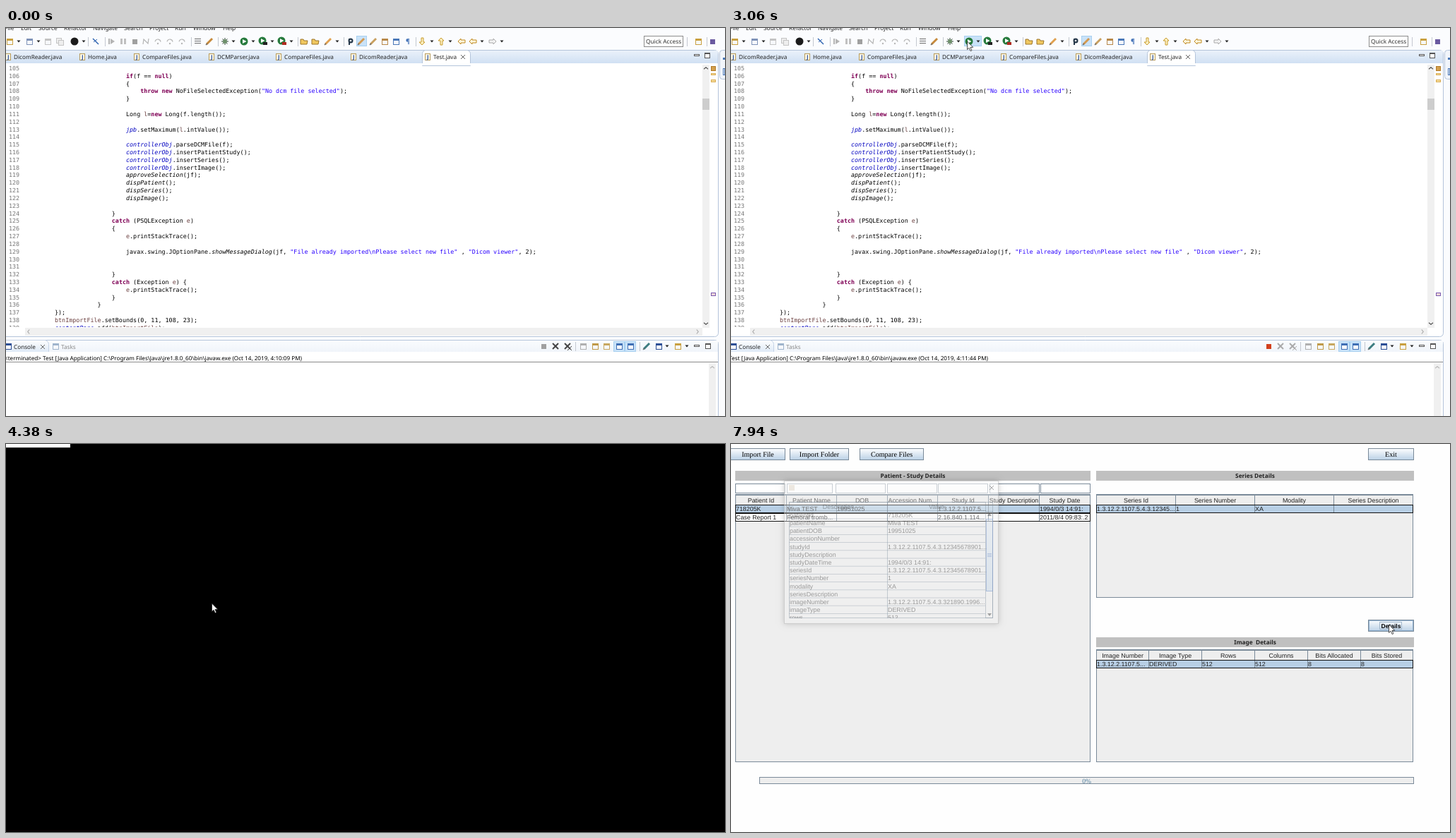
An HTML page with a canvas that plays this animation: 1018x550 px, repeating every 8000 ms.

```html
<!DOCTYPE html>
<html lang="en">
<head>
<meta charset="utf-8">
<title>Dicom viewer</title>
<style>
html, body { margin: 0; width: 100%; height: 100%; overflow: hidden; background: #fff; }
canvas { display: block; width: 1018px; height: 550px; }
</style>
</head>
<body>
<canvas id="stage" width="1018" height="550"></canvas>
<script>
const W = 1018, H = 550, LOOP = 8000;
const ctx = document.getElementById('stage').getContext('2d');
const MONO = '"DejaVu Sans Mono", monospace';
const UI = '"Noto Sans", sans-serif';
const ARIAL = '"Liberation Sans", sans-serif';
const SERIF = '"Liberation Serif", serif';
const CELL = '8.9px ' + ARIAL;
const STEEL = '#7a8a99', PICK = '#b8cfe5', GRAY = '#eeeeee';

function box(x, y, w, h, fill, line) {
  if (fill) { ctx.fillStyle = fill; ctx.fillRect(x, y, w, h); }
  if (line) { ctx.strokeStyle = line; ctx.lineWidth = 1; ctx.strokeRect(x + .5, y + .5, w - 1, h - 1); }
}
function text(s, x, y, font, color = '#000', align = 'left') {
  ctx.font = font; ctx.fillStyle = color; ctx.textAlign = align;
  ctx.fillText(s, x, y);
}
function path(points, line, width = 1, fill) {
  ctx.beginPath();
  points.forEach(([x, y]) => ctx.lineTo(x, y));
  if (fill) { ctx.closePath(); ctx.fillStyle = fill; ctx.fill(); }
  if (line) { ctx.strokeStyle = line; ctx.lineWidth = width; ctx.stroke(); }
}
function disc(x, y, r, fill) {
  ctx.beginPath(); ctx.arc(x, y, r, 0, 7); ctx.fillStyle = fill; ctx.fill();
}
function fade(y0, y1, a, b) {
  const g = ctx.createLinearGradient(0, y0, 0, y1);
  g.addColorStop(0, a); g.addColorStop(1, b);
  return g;
}
function panel(x, y, w, h, r, fill, line) {
  ctx.beginPath(); ctx.roundRect(x + .5, y + .5, w, h, r);
  ctx.fillStyle = fill; ctx.fill();
  ctx.strokeStyle = line; ctx.lineWidth = 1; ctx.stroke();
}

// Small toolbar glyphs, centred on x, y
const glyph = {
  drop(x, y) { path([[x - 2.5, y - 1.5], [x + 2.5, y - 1.5], [x, y + 1.5]], null, 1, '#222'); },
  sep(x, y) { box(x, y - 6, 1, 13, '#c4c8d0'); },
  page(x, y, c) { box(x - 4, y - 4, 9, 9, '#f6f8fc', c); box(x - 4, y - 4, 9, 3, c); },
  multi(x, y, c) { box(x - 5, y - 5, 8, 8, '#eee', c); box(x - 2, y - 2, 8, 8, '#eee', c); },
  square(x, y, c) { box(x - 4, y - 3, 7, 7, c); },
  disc(x, y, c) { disc(x, y, 5.5, c); },
  slash(x, y, c) { path([[x - 4, y - 4], [x + 4, y + 4]], c, 1.5); path([[x - 3, y + 1], [x + 2, y - 3]], c, 1); },
  step(x, y, c) { box(x - 4, y - 4, 2, 8, c); path([[x - 1, y - 4], [x + 5, y], [x - 1, y + 4]], null, 1, c); },
  pause(x, y, c) { box(x - 4, y - 4, 3, 8, c); box(x + 1, y - 4, 3, 8, c); },
  zig(x, y, c) { path([[x - 4, y + 4], [x - 3, y - 3], [x + 3, y + 3], [x + 4, y - 4]], c, 1.2); },
  arc(x, y, c) { ctx.beginPath(); ctx.arc(x, y + 1, 4, 3.3, 6.2); ctx.strokeStyle = c; ctx.lineWidth = 1.2; ctx.stroke(); disc(x, y + 3, 1.2, c); },
  lines(x, y, c) { for (let i = -4; i < 5; i += 3) box(x - 4, y + i, 9, 1, c); },
  bug(x, y, c) { for (let a = 0; a < 3.1; a += .785) path([[x - 5 * Math.cos(a), y - 5 * Math.sin(a)], [x + 5 * Math.cos(a), y + 5 * Math.sin(a)]], c, 1); disc(x, y, 3, '#6d8f6a'); },
  run(x, y, c) { disc(x, y, 5.5, c); path([[x - 2, y - 3], [x + 3.5, y], [x - 2, y + 3]], null, 1, '#fff'); },
  tool(x, y, c) { glyph.run(x - 1, y - 1, '#267a3c'); box(x, y + 1, 6, 4, c); },
  folder(x, y, c) { path([[x - 5, y + 4], [x - 5, y - 3], [x - 1, y - 3], [x, y - 1], [x + 5, y - 1], [x + 4, y + 4]], '#9c7428', 1, c); },
  pen(x, y, c) { path([[x - 4, y + 4], [x + 4, y - 4]], c, 3); path([[x - 5, y + 5], [x - 3, y + 3]], '#666', 1.5); },
  flag(x, y, c) { box(x - 2, y - 4, 2, 9, c); disc(x + 1, y - 1, 3.5, c); disc(x + 1, y - 1, 1.3, '#fff'); },
  left(x, y, c) { path([[x - 5, y], [x - 1, y - 4], [x - 1, y - 2], [x + 5, y - 2], [x + 5, y + 2], [x - 1, y + 2], [x - 1, y + 4], [x - 5, y]], c, 1, '#fdf6dc'); },
  right(x, y, c) { path([[x + 5, y], [x + 1, y - 4], [x + 1, y - 2], [x - 5, y - 2], [x - 5, y + 2], [x + 1, y + 2], [x + 1, y + 4], [x + 5, y]], c, 1, '#f2f2f2'); },
  down(x, y, c) { path([[x, y + 5], [x - 4, y + 1], [x - 1, y + 1], [x - 1, y - 5], [x + 2, y - 5], [x + 2, y + 1], [x + 4, y + 1], [x, y + 5]], c, 1, '#fdf0c0'); },
  up(x, y, c) { path([[x, y - 5], [x - 4, y - 1], [x - 1, y - 1], [x - 1, y + 5], [x + 2, y + 5], [x + 2, y - 1], [x + 4, y - 1], [x, y - 5]], c, 1, '#fdf0c0'); },
  cross(x, y, c) { path([[x - 4, y - 4], [x + 4, y + 4]], c, 2); path([[x + 4, y - 4], [x - 4, y + 4]], c, 2); },
  close(x, y, c) { path([[x - 3, y - 3], [x + 3, y + 3]], c, 1); path([[x + 3, y - 3], [x - 3, y + 3]], c, 1); },
  min(x, y) { box(x - 4, y - 2, 8, 3, '#fff', '#555'); },
  max(x, y) { box(x - 4, y - 4, 8, 8, '#fff', '#555'); box(x - 4, y - 4, 8, 2, '#555'); }
};
function icons(list, y) {
  list.split(',').forEach(item => {
    const [x, kind, color] = item.trim().split(' ');
    glyph[kind](+x, y, color);
  });
}
const TOOLBAR = `5 page #c9a040,18 drop,33 page #7f93b8,46 drop,59 page #c4c4c4,76 multi #c4c4c4,97 disc #1b1b1b,110 drop,
116 sep,127 slash #2d62b0,140 sep,149 step #b4b4b4,166 pause #c0c0c0,183 square #a0a0a0,198 zig #b4b4b4,215 arc #b8b8b8,
232 arc #b8b8b8,249 arc #b8b8b8,262 sep,271 lines #666,288 pen #c78a3c,300 sep,310 bug #33453c,322 drop,
350 drop,364 tool #222,377 drop,391 tool #b02a20,404 drop,413 sep,422 folder #f0c860,438 folder #f0c860,456 pen #e0a050,469 drop,
478 sep,487 flag #26384a,520 pen #c9a060,536 page #b8894a,552 page #4a78b8,580 sep,589 down #c79a2c,603 drop,616 up #c79a2c,
629 drop,645 left #c08a20,661 left #c08a20,674 drop,689 right #aaa,702 drop,964 sep,980 page #c9a040,992 sep,1001 square #6a5aa0`;
const CONSOLE = `806 sep,817 page #b0b0b0,834 page #c09a48,850 page #c8a860,868 page #3f6fb5,884 page #3f6fb5,897 sep,
907 pen #3c7d80,924 page #2c4f96,936 drop,951 page #c9a040,964 drop,978 min,994 max`;

const CODE = [[], [5, 'if(f == null)'], [5, '{'], [6, 'throw new NoFileSelectedException("No dcm file selected");'],
  [5, '}'], [], [5, 'Long l=new Long(f.length());'], [], [5, 'jpb.setMaximum(l.intValue());'], [],
  [5, 'controllerObj.parseDCMFile(f);'], [5, 'controllerObj.insertPatientStudy();'],
  [5, 'controllerObj.insertSeries();'], [5, 'controllerObj.insertImage();'], [5, 'approveSelection(jf);'],
  [5, 'dispPatient();'], [5, 'dispSeries();'], [5, 'dispImage();'], [], [4, '}'],
  [4, 'catch (PSQLException e)'], [4, '{'], [5, 'e.printStackTrace();'], [],
  [5, 'javax.swing.JOptionPane.showMessageDialog(jf, "File already imported\\nPlease select new file" , "Dicom viewer", 2);'],
  [], [], [4, '}'], [4, 'catch (Exception e) {'], [5, 'e.printStackTrace();'], [4, '}'], [3, '}'], [0, '});'],
  [0, 'btnImportFile.setBounds(0, 11, 108, 23);'], [0, 'contentPane.add(btnImportFile);']];
const CHAR = 5.05, LINE = 10.82;

function style(t) {
  if (t[0] === '"') return ['', '#2a00ff'];
  if (/^(if|null|throw|new|catch)$/.test(t)) return ['bold ', '#7f0055'];
  if (/^(jpb|controllerObj|contentPane)$/.test(t)) return ['italic ', '#0000c0'];
  if (/^(approveSelection|disp\w+|showMessageDialog)$/.test(t)) return ['italic ', '#000'];
  if (/^(l|e|btnImportFile)$/.test(t)) return ['', '#6a3e3e'];
  return ['', '#000'];
}
function code() {
  ctx.save();
  ctx.beginPath(); ctx.rect(0, 50, 986, 374); ctx.clip();
  CODE.forEach(([indent, src], i) => {
    const y = 60 + i * LINE;
    text(105 + i, 4, y, '8.39px ' + MONO, '#787878');
    if (!src) return;
    for (const m of src.matchAll(/"[^"]*"|\w+|[^\w"\s]+/g)) {
      const [face, color] = style(m[0]);
      text(m[0], 69 + indent * 4 * CHAR + m.index * CHAR, y, face + '8.39px ' + MONO, color);
    }
  });
  ctx.restore();
}
function chevron(x, y, dx, dy, c = '#555') {
  path([[x - dx - dy * 2.5, y - dy - dx * 2.5], [x + dx, y + dy], [x - dx + dy * 2.5, y - dy + dx * 2.5]], c, 1.2);
}
function javaFile(x) {
  box(x - 4, 36, 8, 10, '#fffbe8', '#b89a58');
  text('J', x - 1, 44, 'bold 8px ' + UI, '#2b4f9e');
}

function ide(t) {
  box(0, 0, W, H, '#fbfcfe');
  'File Edit Source Refactor Navigate Search Project Run Window Help'.split(' ').forEach((s, i) =>
    text(s, [-2, 21, 46, 82, 123, 167, 203, 239, 265, 307][i], 3, '8.36px ' + UI, '#222'));
  if (t >= 1820) box(330, 11, 25, 15, '#c9e2f8', '#a8d0f0');
  box(496, 11, 15, 15, '#c9e2f8', '#a8d0f0');
  icons(TOOLBAR, 19);
  glyph.run(337, 19, '#267a3c');
  glyph.pen(503, 19, '#d49a50');
  text('¶', 569, 22, 'bold 9px ' + UI, '#3f6fb5', 'center');
  box(903, 11, 56, 16, '#fff', '#8c8c8c');
  text('Quick Access', 906, 22, '8.3px ' + UI, '#333');

  // Editor
  panel(-8, 31, 1016, 406, 5, '#fff', '#b4c4da');
  box(0, 32, 1008, 18, fade(32, 50, '#eaf1fa', '#d0e0f3'));
  panel(589, 31, 68, 22, [5, 5, 0, 0], '#fff', '#b4c4da');
  box(0, 50, 1008, 3, '#fff');
  'DicomReader Home CompareFiles DCMParser CompareFiles DicomReader Test'.split(' ').forEach((s, i) => {
    const x = [11, 116, 193, 299, 394, 500, 605][i];
    javaFile(x - 8);
    text(s + '.java', x, 43.5, '8.2px ' + UI, '#222');
  });
  glyph.close(647, 41, '#666');
  glyph.min(978, 39); glyph.max(993, 39);
  code();
  box(986, 52, 10, 373, '#f0f0f0');
  box(986, 100, 10, 16, '#cdcdcd');
  chevron(991, 57, 0, -1.2); chevron(991, 419, 0, 1.2);
  box(27, 425, 959, 11, '#f0f0f0');
  chevron(32, 430.5, -1.2, 0, '#aaa'); chevron(979, 430.5, 1.2, 0, '#aaa');
  box(998, 54, 7, 7, '#d3a04f', '#b07a28');
  box(998, 64, 7, 3, '#f6dc9a', '#d8ab52');
  box(998, 73, 7, 4, '#f6dc9a', '#d8ab52');
  box(998, 375, 7, 5, '#f2d8d8', '#7a5ab0');
  panel(1010, 31, 20, 41, 4, '#f1f5fb', '#b4c4da');
  box(1015, 42, 3, 3, '#4a78b8'); box(1015, 57, 3, 10, '#fff', '#4a78b8');

  // Console
  const live = t >= 2360;
  panel(-8, 442, 1016, 130, 5, '#fff', '#b4c4da');
  box(0, 443, 1008, 16, fade(443, 459, '#fafcfe', '#f0f4fa'));
  panel(-8, 442, 68, 20, [0, 6, 0, 0], fade(442, 460, '#fff', '#dce8f6'), '#c4d2e6');
  box(0, 459, 1008, 15, '#fff');
  glyph.page(3, 451, '#2c4f96');
  text('Console', 11, 454.5, '8.2px ' + UI, '#222');
  glyph.close(52, 452, '#666');
  glyph.page(70, 451, '#9fb4cc');
  text('Tasks', 78, 454.5, '8.2px ' + UI, '#888');
  box(860, 444, 16, 15, '#c9e2f8', '#a8d0f0'); box(876, 444, 16, 15, '#c9e2f8', '#a8d0f0');
  icons(CONSOLE, 451);
  glyph.square(762, 451, live ? '#d2401c' : '#a0a0a0');
  glyph.cross(778, 451, live ? '#aaa' : '#444');
  glyph.cross(795, 451, live ? '#aaa' : '#444'); glyph.close(798, 454, live ? '#aaa' : '#444');
  text((live ? '' : '<terminated> ') + 'Test [Java Application] C:\\Program Files\\Java\\jre1.8.0_60\\bin\\javaw.exe (Oct 14, 2019, 4:1' +
    (live ? '1:44' : '0:09') + ' PM)', live ? 364 : 419, 471, '8.15px ' + UI, '#000', 'right');
  box(0, 473, 1008, 1, '#8a8a8a');
  box(995, 475, 10, 75, '#f0f0f0');
  chevron(1000, 481, 0, -1.2, '#bbb');
}

// Window opening over the IDE: time, darkness, right edge
const OPENING = [[3210, .1, 975], [3290, .31, 991], [3380, .62, 1005], [3440, .88, W], [3520, 1, W]];
function opening(t) {
  const now = OPENING.filter(s => t >= s[0]).pop();
  if (!now) return;
  const [, dark, edge] = now;
  box(0, 0, edge, H, `rgba(0,0,0,${dark})`);
  if (edge < W) {
    const g = ctx.createLinearGradient(edge, 0, edge + 16, 0);
    g.addColorStop(0, `rgba(0,0,0,${dark * .6})`); g.addColorStop(1, 'rgba(0,0,0,0)');
    box(edge, 0, 16, H, g);
  }
  box(0, 0, 91, 5, `rgba(255,255,255,${Math.min(1, dark * 1.6)})`);
  if (dark > .8) box(0, 547, W, 2, '#0a0204');
}

function button(s, x, w, y, h, font, hot) {
  box(x, y, w, h, fade(y, y + h, '#fff', PICK), STEEL);
  if (hot) box(x + 1, y + 1, w - 2, h - 2, null, '#8fb0d0');
  text(s, x + w / 2, Math.round(y + h / 2 + 3), font, '#000', 'center');
}
function heading(s, x, w, y) {
  box(x, y, w, 14, '#c0c0c0');
  text(s, x + w / 2, y + 10, 'bold 8.3px ' + UI, '#222', 'center');
}
function clipped(s, x, y, w, color) {
  ctx.save();
  ctx.beginPath(); ctx.rect(x, y - 10, w, 14); ctx.clip();
  text(s, x + 1, y, CELL, color);
  ctx.restore();
}
function table(cols, y, bottom, heads, rows) {
  const x = cols[0], end = cols[cols.length - 1];
  box(x, y, end - x + 1, bottom - y, GRAY, STEEL);
  heads.forEach((s, i) => {
    box(cols[i], y + 1, cols[i + 1] - cols[i] + 1, 15, GRAY, STEEL);
    text(s, (cols[i] + cols[i + 1]) / 2 + .5, y + 12, CELL, '#222', 'center');
  });
  rows.forEach((row, r) => {
    const top = y + 15 + r * 12;
    box(x, top, end - x, 12, r ? '#fff' : PICK);
    row.forEach((s, i) => {
      if (i) box(cols[i], top, 1, 12, STEEL);
      clipped(s, cols[i], top + 9.3, cols[i + 1] - cols[i], '#222');
    });
    box(x, top, end - x + 1, 12, null, '#111');
  });
}

const NAME = 'Miva TEST', ID = '718205K', UID = '1.3.12.2.1107.5';
function viewer(t) {
  box(0, 0, W, H, '#fefefe');
  const serif = '10.1px ' + SERIF;
  button('Import File', -1, 78, 6, 17, serif);
  if (t < 7480) box(14, 8, 48, 13, null, '#a3b8cc');
  button('Import Folder', 83, 84, 6, 17, serif);
  button('Compare Files', 182, 91, 6, 17, serif);
  button('Exit', 902, 65, 6, 17, serif);
  heading('Patient - Study Details', 6, 503, 38);
  heading('Series Details', 517, 450, 38);
  heading('Image  Details', 517, 450, 274);
  [6, 79, 148, 221, 293, 366, 438].forEach((x, i) => box(x, 56, i === 1 ? 65 : 71, 14, '#fff', STEEL));
  table([6, 78, 149, 221, 292, 364, 436, 508], 71, 451,
    ['Patient Id', 'Patient Name', 'DOB', 'Accession Num...', 'Study Id', 'Study Description', 'Study Date'],
    [[ID, NAME, '19951025', '', UID + '...', '', '1994/0/3 14:91:'],
     ['Case Report 1', 'Femoral tromb...', '', '', '2.16.840.1.114...', '', '2011/8/4 09:83:.2']]);
  table([517, 629, 741, 853, 965], 71, 218, ['Series Id', 'Series Number', 'Modality', 'Series Description'],
    [[UID + '.4.3.12345...', '1', 'XA', '']]);
  table([517, 591, 666, 741, 816, 891, 965], 291, 451,
    ['Image Number', 'Image Type', 'Rows', 'Columns', 'Bits Allocated', 'Bits Stored'],
    [[UID + '...', 'DERIVED', '512', '512', '8', '8']]);
  button('Details', 902, 65, 249, 17, 'bold 8.5px ' + ARIAL, t >= 7200);
  if (t >= 7480) box(918, 252, 32, 11, null, '#a3b8cc');
  box(40, 472, 927, 10, GRAY, STEEL);
  text('0%', 503.5, 481, '9.5px ' + SERIF, '#4f7f9f', 'center');
  if (t >= 7940) dialog();
}

const FIELDS = [['patientId', ID], ['patientName', NAME], ['patientDOB', '19951025'], ['accessionNumber', ''],
  ['studyId', UID + '.4.3.12345678901...'], ['studyDescription', ''], ['studyDateTime', '1994/0/3 14:91:'],
  ['seriesId', UID + '.4.3.12345678901...'], ['seriesNumber', '1'], ['modality', 'XA'], ['seriesDescription', ''],
  ['imageNumber', UID + '.4.3.321890.1996...'], ['imageType', 'DERIVED'], ['rows', '512']];
function dialog() {
  ctx.save();
  ctx.globalAlpha = .38;

  // Shadow only around the window, not beneath it
  ctx.save();
  ctx.beginPath(); ctx.rect(0, 0, W, H); ctx.rect(75, 52, 304, 203); ctx.clip('evenodd');
  ctx.shadowColor = 'rgba(0,0,0,.5)'; ctx.shadowBlur = 8;
  box(75, 52, 304, 203, '#000');
  ctx.restore();

  box(75, 52, 304, 203, GRAY, '#999');
  box(76, 53, 302, 18, '#fff');
  box(82, 58, 8, 8, '#d2c4b0');
  glyph.close(369, 62, '#222');
  ctx.beginPath(); ctx.rect(82, 82, 290, 165); ctx.clip();
  box(82, 82, 289, 165, null, STEEL);
  box(82, 82, 279, 13, null, STEEL);
  text('Description', 152, 92, CELL, '#222', 'center');
  text('Value', 291, 92, CELL, '#222', 'center');
  FIELDS.forEach(([k, v], i) => {
    const y = 95 + i * 11.2;
    box(82, y + 10.6, 278, .8, STEEL);
    text(k, 83, y + 8.7, CELL, '#111');
    text(v, 222, y + 8.7, CELL, '#111');
  });
  box(221, 82, 1, 165, STEEL);
  box(360, 95, 11, 152, null, STEEL);
  box(361, 106, 10, 103, fade(106, 209, '#dde8f3', PICK), '#6382bf');
  for (let i = -2; i < 3; i += 2) box(363, 157 + i, 6, 1, '#6382bf');
  path([[363, 102], [369, 102], [366, 98]], null, 1, '#222');
  path([[363, 240], [369, 240], [366, 244]], null, 1, '#222');
  ctx.restore();
}

// Pointer moves: start, end, steps, way points
const MOVES = [
  [190, 950, 11, [[780, 495], [330, 8], [320, 22]]],
  [1040, 1820, 11, [[320, 22], [534, 48], [283, 20], [354, 14]]],
  [1910, 2050, 3, [[354, 14], [334, 18]]],
  [3980, 4380, 6, [[334, 18], [291, 225]]],
  [5860, 6640, 11, [[291, 225], [113, 100], [450, 200], [774, 297]]],
  [6700, 7340, 9, [[774, 297], [860, 364], [936, 242], [931, 255]]]
];
function pointer(t) {
  const move = MOVES.filter(m => t >= m[0]).pop();
  if (!move) return null;
  const [start, end, steps, pts] = move;
  const done = Math.min(steps, 1 + Math.floor((t - start) / (end - start) * (steps - 1) + 1e-6));
  const u = done / steps * (pts.length - 1);
  const i = Math.min(pts.length - 2, Math.floor(u)), f = u - i;
  return [0, 1].map(k => pts[i][k] + (pts[i + 1][k] - pts[i][k]) * f);
}
function arrow(t) {
  const p = pointer(t);
  if (!p) return;
  const [x, y] = p.map(Math.round);
  if ((t >= 2200 && t < 2360) || (t >= 7480 && t < 7650)) disc(x + .5, y + .5, 9, 'rgba(255,240,0,.5)');
  const shape = [[0, 0], [0, 11.5], [2.6, 9.2], [4.6, 13.6], [6.4, 12.8], [4.5, 8.5], [8.2, 8.3], [0, 0]];
  path(shape.map(([a, b]) => [x + .5 + a, y + 1 + b]), '#222', .8, '#fff');
}

function draw() {
  const t = performance.now() % LOOP;
  ctx.textRendering = 'geometricPrecision';
  if (t < 5230) { ide(t); opening(t); } else viewer(t);
  arrow(t);
  requestAnimationFrame(draw);
}
draw();
</script>
</body>
</html>
```
